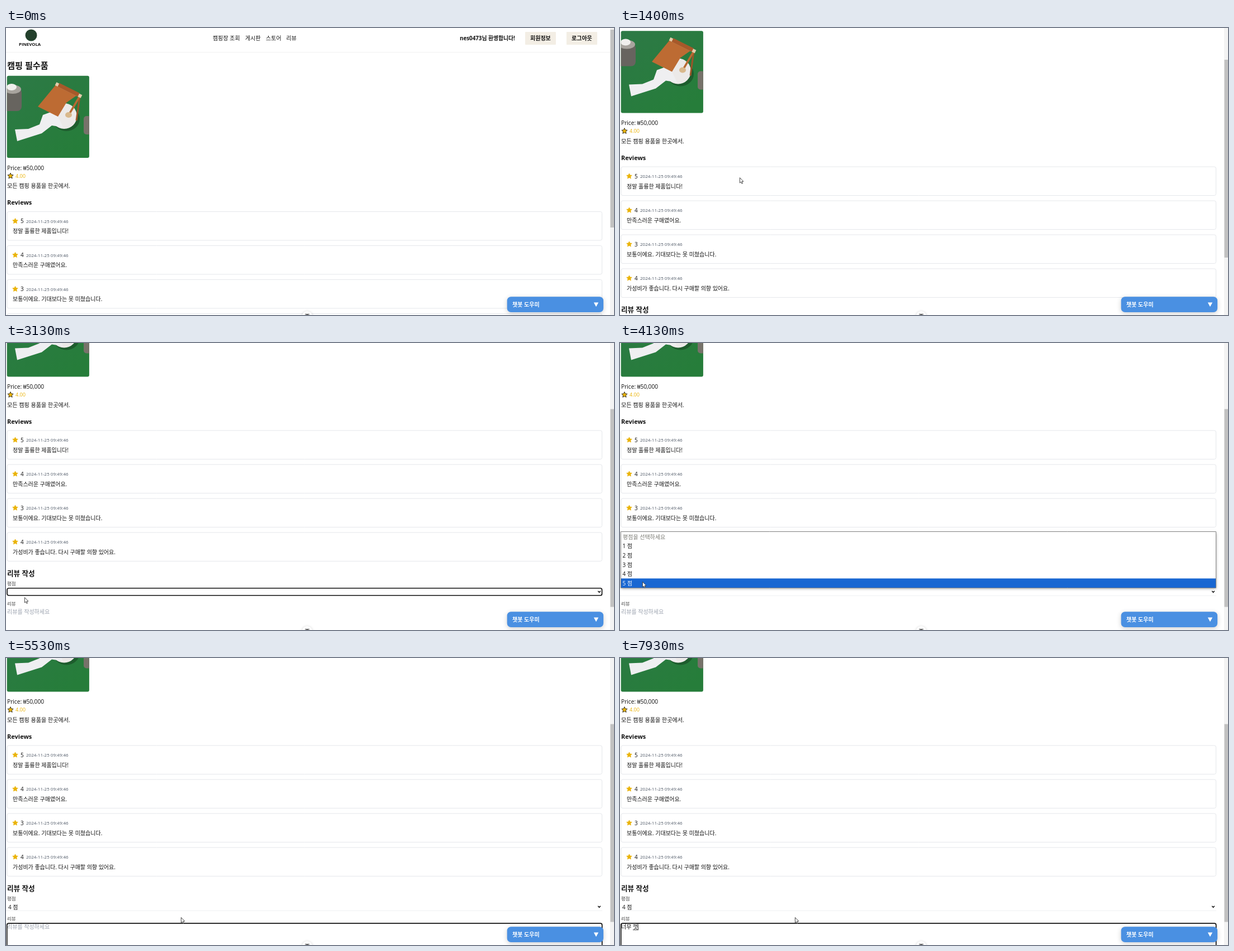
Animation, 1088 px wide and 515 px high, one loop 8000 ms. Source, as an HTML page with a canvas:

```html
<!DOCTYPE html>
<html lang="ko">
<head>
<meta charset="utf-8">
<title>캠핑 필수품</title>
<style>
html, body { margin: 0; width: 100%; height: 100%; overflow: hidden; background: #fff; }
canvas { display: block; width: 1088px; height: 515px; }
</style>
</head>
<body>
<canvas id="stage" width="1088" height="515"></canvas>
<script>
const ctx = document.getElementById('stage').getContext('2d');
const LOOP = 8000;
const TICK = 1000 / 15;
const FONT = '"Open Sans", "Noto Sans CJK KR", "Noto Sans CJK JP", "Noto Sans CJK", sans-serif';
const INK = '#111';

// Ticks at which the form changes
const FOCUS = 42, OPEN = 54, CHOOSE = 70, WRITE = 80;

const MOVES = [
  { from: 1, to: 6, x: 245, y: 257 },
  { from: 10, to: 13, x: 230, y: 280 },
  { from: 13, to: 18, x: 214, y: 268 },
  { from: 27, to: 33, x: 59, y: 462 },
  { from: 33, to: 40, x: 48, y: 436 },
  { from: 44, to: 47, x: 33, y: 456 },
  { from: 47, to: 51, x: 40, y: 443 },
  { from: 60, to: 64, x: 40, y: 413 },
  { from: 70, to: 82, x: 207, y: 476 },
  { from: 82, to: 83, x: 313, y: 465 }
];
const TYPING = [[104, 'ㄴ'], [106, '너'], [109, '넘'], [110, '너무'], [112, '너무 '],
  [115, '너무 ㄲ'], [116, '너무 꺼'], [119, '너무 껏']];
const REVIEWS = [
  [5, '정말 훌륭한 제품입니다!'],
  [4, '만족스러운 구매였어요.'],
  [3, '보통이에요. 기대보다는 못 미쳤습니다.'],
  [4, '가성비가 좋습니다. 다시 구매할 의향 있어요.']
];

function ease(tick, from, to) {
  const k = Math.min(1, Math.max(0, (tick - from) / (to - from)));
  return k * k * (3 - 2 * k);
}

// Two turns of the wheel
const scrollAt = tick => 48.3 * ease(tick, 14, 19) + 124.2 * ease(tick, 20, 23);

function pointerAt(tick) {
  let x = 965, y = 497;
  for (const move of MOVES) {
    const k = ease(tick, move.from, move.to);
    x += (move.x - x) * k;
    y += (move.y - y) * k;
  }
  return [x, y];
}

function text(str, x, middle, size = 10, color = INK, weight = 400) {
  ctx.font = `${weight} ${size}px ${FONT}`;
  ctx.fillStyle = color;
  ctx.fillText(str, x, middle + size * 0.37);
}

function paint(fill, stroke, line) {
  if (fill) { ctx.fillStyle = fill; ctx.fill(); }
  if (stroke) { ctx.strokeStyle = stroke; ctx.lineWidth = line; ctx.stroke(); }
}

function rect(x, y, w, h, color) {
  ctx.fillStyle = color;
  ctx.fillRect(x, y, w, h);
}

function box(x, y, w, h, r, fill, stroke, line = 1) {
  ctx.beginPath();
  ctx.roundRect(x, y, w, h, r);
  paint(fill, stroke, line);
}

function poly(points, fill, stroke, line = 1) {
  ctx.beginPath();
  points.forEach(([x, y]) => ctx.lineTo(x, y));
  if (fill) ctx.closePath();
  paint(fill, stroke, line);
}

function oval(x, y, rx, ry, fill) {
  ctx.beginPath();
  ctx.ellipse(x, y, rx, ry, 0, 0, Math.PI * 2);
  paint(fill);
}

function withShadow(blur, dy, color, draw) {
  ctx.save();
  ctx.shadowBlur = blur;
  ctx.shadowOffsetY = dy;
  ctx.shadowColor = color;
  draw();
  ctx.restore();
}

function star(x, y, r, stroke = '#eab308') {
  const points = Array.from({ length: 10 }, (_, i) => {
    const d = i % 2 ? r * 0.48 : r, a = i * Math.PI / 5 - Math.PI / 2;
    return [x + d * Math.cos(a), y + d * Math.sin(a)];
  });
  ctx.lineJoin = 'round';
  poly(points, '#eab308', stroke, 0.8);
}

function drawHeader() {
  oval(45, 13, 10.5, 10.5, '#23402c');
  text('PINEVOLA', 23, 29, 7.8, INK, 700);
  text('캠핑장 조회', 370, 18.5);
  text('게시판', 428, 18.5);
  text('스토어', 465, 18.5);
  text('리뷰', 501.5, 18.5);
  text('nes0473님 환영합니다!', 812, 18.5, 9.8, INK, 700);
  ['회원정보', '로그아웃'].forEach((label, i) => {
    const x = 929 + i * 74;
    box(x, 7, 55, 23, 1, '#f3eee5');
    text(label, x + 9, 18.5, 10, INK, 700);
  });
  rect(0, 43, 1081, 1, '#f0f0f1');
}

function drawPhoto() {
  ctx.save();
  ctx.beginPath();
  ctx.roundRect(1.7, 85.7, 147.2, 147.2, 3);
  ctx.clip();
  const grass = ctx.createLinearGradient(2, 86, 110, 233);
  grass.addColorStop(0, '#2d7946');
  grass.addColorStop(1, '#267d3a');
  rect(1, 85, 149, 149, grass);

  // Tree stumps
  box(-10, 108, 38, 41, 8, '#67645f');
  oval(12, 110, 15, 8, '#a8a49e');
  oval(10, 106, 9, 6, '#f0efed');
  box(139, 158, 20, 33, 5, '#77726a');

  // Paper roll with its unrolled end
  oval(108, 163, 24, 22, '#1d5c2d');
  oval(104, 158, 23, 23, '#ece9e8');
  poly([[66, 156], [88, 148], [102, 178], [82, 175], [64, 189], [20, 203],
    [16, 182], [40, 181], [60, 173]], '#efeff1');

  // Leather holder
  poly([[132, 122], [126, 166]], null, '#9b5428', 3);
  poly([[131, 124], [114, 153]], null, '#b76a32', 3.5);
  oval(112, 156, 6, 5, '#d9b88c');
  poly([[90, 101], [128, 120], [108, 134], [93, 159], [57, 141]], '#bd6b33');
  poly([[89, 100], [135, 123]], null, '#e2ccaa', 6);
  poly([[94, 102], [130, 120]], null, '#a7592a', 7);
  ctx.restore();
}

function drawReview([rating, message], i) {
  const y = 329.5 + i * 61;
  box(2, y, 1064.5, 51.5, 3, '#fff', '#e5e7eb');
  star(16.5, y + 17, 5);
  text(rating, 26, y + 17);
  text('2024-11-25 09:49:46', 36, y + 17.2, 8, '#4b5563');
  text(message, 12, y + 35);
}

function drawEntry(tick) {
  const state = TYPING.filter(([at]) => at <= tick).pop();
  if (!state) {
    text('리뷰를 작성하세요', 2, 655, 10, '#9ca3af');
    return;
  }
  const entry = state[1], last = entry.slice(-1);
  text(entry, 2, 655);
  const end = 2 + ctx.measureText(entry).width;
  const width = ctx.measureText(last).width;
  if (last !== ' ') rect(end - width, 660, width, 0.8, INK);
  rect(end, 649.8, 0.8, 11, INK);
}

function drawForm(tick) {
  text('리뷰 작성', 2, 585.5, 12.6, INK, 700);
  text('평점', 2, 604.5, 8.5, '#444');
  rect(0, 625.5, 1067, 1, '#f0f1f3');
  if (tick >= FOCUS && tick < OPEN) box(2, 612.5, 1064.5, 13, 3, null, INK, 1.7);
  if (tick >= CHOOSE) text('4 점', 4, 619.5);
  poly([[1059.3, 617.5], [1061.6, 619.9], [1063.9, 617.5]], null, INK, 1.5);

  text('리뷰', 2, 640.5, 8.5, '#444');
  if (tick >= WRITE) box(1.7, 648.7, 1065, 90, 3, null, INK, 1.7);
  drawEntry(tick);
}

function drawPage(tick, scroll) {
  ctx.save();
  ctx.translate(0, -scroll);
  drawHeader();
  text('캠핑 필수품', 2, 67.5, 15.2, INK, 700);
  drawPhoto();
  text('Price: ₩50,000', 2, 251, 10.2);
  star(8, 265.5, 5.4, INK);
  text('4.00', 17, 265.3, 9.1, '#eab308');
  text('모든 캠핑 용품을 한곳에서.', 2, 283.5, 10.1);
  text('Reviews', 2, 313, 11, INK, 700);
  REVIEWS.forEach(drawReview);
  drawForm(tick);
  ctx.restore();
}

function drawOptions(pointerY) {
  const top = 339.5, row = 16.6;
  const active = Math.floor((pointerY - top) / row);
  withShadow(5, 1, 'rgba(0,0,0,.4)', () => box(1.5, 338.5, 1065, 101, 0, '#fff'));
  box(1.5, 338.5, 1065, 101, 0, null, '#858585');
  text('평점을 선택하세요', 5, 348, 10, '#7b7b74');
  for (let i = 1; i <= 5; i++) {
    if (i === active) rect(2, top + i * row, 1064, row, '#1967d2');
    text(`${i} 점`, 4.5, 348 + i * row, 10, i === active ? '#fff' : INK);
  }
}

function drawOverlays(scroll) {
  rect(1081, 0, 7, 515, '#f3f3f3');
  rect(1081.5, 3 + scroll * 0.67, 6.5, 355, '#c1c1c1');

  withShadow(5, 1, 'rgba(0,0,0,.22)', () => oval(539, 517, 9, 9, '#fff'));
  rect(535, 513, 8, 1, '#444');
  rect(537, 514.3, 4, 0.7, '#444');

  withShadow(8, 2, 'rgba(0,0,0,.2)', () => box(896.7, 482.2, 172.4, 27.8, 7, '#4a90e2'));
  text('챗봇 도우미', 906, 496, 10, '#fff', 700);
  poly([[1051.8, 492.5], [1060.2, 492.5], [1056, 500.2]], '#fff');
}

function drawPointer(x, y) {
  ctx.save();
  ctx.translate(x, y);
  ctx.lineJoin = 'miter';
  poly([[0.4, 0.6], [0.4, 10], [2.5, 8.2], [4, 11.4], [5.5, 10.7], [4, 7.6], [6.8, 7.3]],
    '#fff', '#333', 0.9);
  ctx.restore();
}

function render() {
  // The picture advances in 15 fps steps
  const tick = Math.floor((performance.now() % LOOP) / TICK + 0.15);
  const scroll = scrollAt(tick);
  const [x, y] = pointerAt(tick);
  rect(0, 0, 1088, 515, '#fff');
  drawPage(tick, scroll);
  if (tick >= OPEN && tick < CHOOSE) drawOptions(y);
  drawOverlays(scroll);
  if (tick >= 1) drawPointer(x, y);
  requestAnimationFrame(render);
}
render();
</script>
</body>
</html>
```
